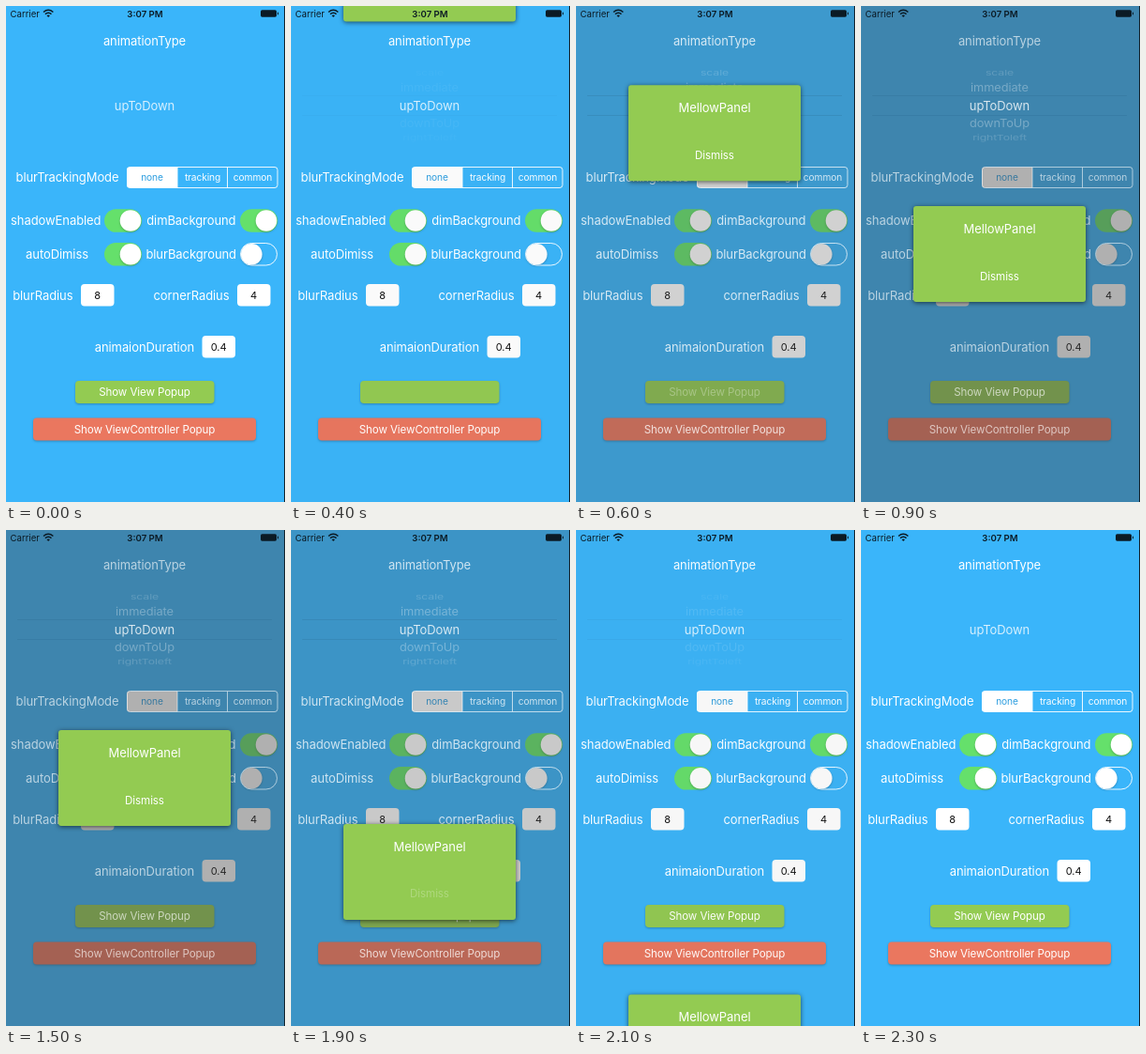
An HTML page for the animation above (2.4 s loop, 298 by 528 pixels).

```html
<!DOCTYPE html>
<html lang="en">
<head>
<meta charset="utf-8">
<title>Popup demo</title>
<style>
  html, body { margin: 0; width: 100%; height: 100%; overflow: hidden; background: #3ab5fa; }
  svg { display: block; width: 298px; height: 528px; }
  text { font-family: Inter, Roboto, "Liberation Sans", sans-serif; fill: #fff; }
  .label { font-size: 13px; letter-spacing: -.08px; }
  .small { font-size: 10.2px; letter-spacing: -.1px; }
  .button { font-size: 11.6px; letter-spacing: -.1px; }
  .dark { font-size: 11px; fill: #111; }
  .mid { text-anchor: middle; }
  .end { text-anchor: end; }
  .line { fill: none; stroke: #fff; stroke-width: .9; }
  .soft { filter: drop-shadow(0 1px 1px rgba(0, 0, 0, .25)); }
  #popup { filter: drop-shadow(0 1px 2.5px rgba(0, 0, 0, .6)); }
  #status text { fill: #0b1a24; font-size: 9.6px; }
</style>
</head>
<body>
<svg viewBox="0 0 298 528">
  <rect width="298" height="528" fill="#3ab5fa"/>

  <g id="fills">
    <path d="M132 171.500H183V193.500H132a3 3 0 0 1-3-3V174.500a3 3 0 0 1 3-3z" fill="#fff"/>
    <g id="switches"></g>
    <g id="fields"></g>
    <rect class="soft" x="74" y="399" width="148.500" height="24" rx="4" fill="#93cb52"/>
    <rect class="soft" x="29" y="438.500" width="238" height="24" rx="4" fill="#ea775f"/>
    <text class="small mid" x="156" y="186" style="fill:#2f9fe0">none</text>
  </g>

  <rect id="dim" width="298" height="528" fill="#444"/>

  <g id="ink">
    <g id="labels"></g>
    <rect class="line" x="129.500" y="171.500" width="160.500" height="22" rx="3"/>
    <path class="line" d="M183 171.500v22M236.500 171.500v22"/>
    <rect class="line" x="250.500" y="252.500" width="39" height="23.500" rx="11.750"/>
    <text class="small mid" x="210" y="186">tracking</text>
    <text class="small mid" x="263.500" y="186">common</text>
    <text class="button mid" id="show" x="148" y="415">Show View Popup</text>
    <text class="button mid" x="148" y="455">Show ViewController Popup</text>
  </g>

  <text class="label mid" x="148" y="110.500" opacity=".8">upToDown</text>
  <g id="picker">
    <path d="M12 95.500H284M12 116.500H284" stroke="#245f85" stroke-opacity=".22"/>
    <g id="rows" class="label mid"></g>
  </g>

  <g id="popup">
    <rect x="56" width="184" height="102" rx="3" fill="#93cb52"/>
    <text class="label mid" x="148" y="29">MellowPanel</text>
    <text class="button mid" id="dismiss" x="148" y="78.500">Dismiss</text>
  </g>

  <g id="status">
    <text x="4.500" y="11.500">Carrier</text>
    <path d="M40 6.500q5.200-4.400 10.400 0M41.900 8.700q3.300-2.700 6.600 0" fill="none" stroke="#0b1a24" stroke-width="1.500"/>
    <path d="M43.500 10.200q1.700-1.300 3.400 0l-1.700 1.900z" fill="#0b1a24"/>
    <text class="mid" x="148.500" y="11.500" font-weight="600">3:07 PM</text>
    <rect x="272" y="4.300" width="17" height="7.400" rx="1.600" fill="#0b1a24"/>
    <path d="M290.500 6.700v2.600" stroke="#0b1a24"/>
  </g>
  <path d="M297.500 0V528" stroke="#10202b"/>
</svg>

<script>
  const $ = id => document.getElementById(id);
  const LOOP = 2400, STEP = 100, SLIDE = 474, REST = 213, TRAVEL = 315;

  // text, x, baseline, anchor class
  $('labels').innerHTML = [
    ['animationType', 148, 41.5, 'mid'],
    ['blurTrackingMode', 120.5, 187, 'end'],
    ['shadowEnabled', 101.5, 232.5, 'end'],
    ['dimBackground', 245.5, 232.5, 'end'],
    ['autoDimiss', 88, 268.5, 'end'],
    ['blurBackground', 246, 268.5, 'end'],
    ['blurRadius', 71.5, 312.5, 'end'],
    ['cornerRadius', 238.5, 312.5, 'end'],
    ['animaionDuration', 201, 367.5, 'end']
  ].map(([s, x, y, a]) => `<text class="label ${a}" x="${x}" y="${y}">${s}</text>`).join('');

  // text, centre y, vertical squash, opacity
  $('rows').innerHTML = [
    ['scale', 71, .6, .18],
    ['immediate', 87, .9, .3],
    ['downToUp', 125, .9, .3],
    ['rightToleft', 140, .6, .18]
  ].map(([s, y, k, o]) =>
    `<text transform="translate(148 ${y}) scale(${.86 + k * .14} ${k})" y="4.500" opacity="${o}">${s}</text>`
  ).join('');

  const toggle = (x, y, on) =>
    (on ? `<rect x="${x}" y="${y - 12.3}" width="40" height="24.600" rx="12.300" fill="#65e06b"/>` : '') +
    `<circle class="soft" cx="${x + (on ? 28 : 12.3)}" cy="${y}" r="11.300" fill="#fff"/>`;
  $('switches').innerHTML = toggle(105, 228.5, true) + toggle(250, 228.5, true) +
    toggle(105, 264.3, true) + toggle(250, 264.3, false);

  $('fields').innerHTML = [[80, 296, '8'], [247, 296, '4'], [209.5, 351, '0.4']].map(([x, y, s]) =>
    `<rect x="${x}" y="${y}" width="35.500" height="23.500" rx="4" fill="#fff"/>
     <text class="dark mid" x="${x + 17.6}" y="${y + 15.8}">${s}</text>`).join('');

  const clamp = v => Math.max(0, Math.min(1, v));
  const ease = v => { v = clamp(v); return v * v * (3 - 2 * v); };
  const start = performance.now();

  function draw(now) {
    const t = Math.floor((Math.max(0, now - start) % LOOP) / STEP) * STEP;
    const enter = ease((t - 334) / SLIDE);
    const leave = ease((t - 1722) / SLIDE);
    const dim = enter - leave;

    $('popup').setAttribute('transform', `translate(0 ${REST + TRAVEL * (enter - 1 + leave)})`);
    $('popup').style.visibility = dim > 0 ? 'visible' : 'hidden';
    $('dim').setAttribute('opacity', .42 * dim);
    $('ink').setAttribute('opacity', 1 - .36 * dim);
    $('picker').setAttribute('opacity', clamp(dim * 3.5));

    // pressed titles vanish, then fade back
    $('show').setAttribute('opacity', t < 400 ? 1 : clamp((t - 500) / 250));
    $('dismiss').setAttribute('opacity', t < 1800 ? 1 : clamp(.25 + (t - 1900) / 180));
    requestAnimationFrame(draw);
  }
  draw(start);
</script>
</body>
</html>
```
